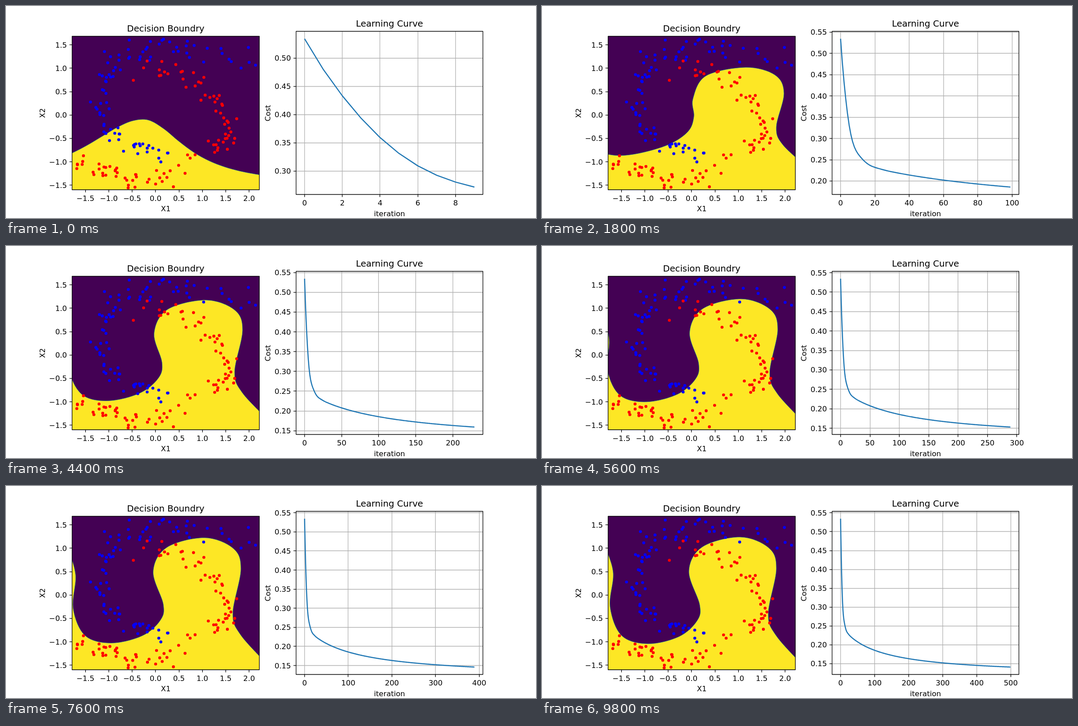
These frames come from a looping animation (1183 px wide and 473 px high, 10 s). An HTML page with a canvas:

```html
<!DOCTYPE html>
<html lang="en">
<head>
<meta charset="utf-8">
<title>Decision boundary and learning curve</title>
<style>
html, body { margin: 0; height: 100%; overflow: hidden; background: #fff; }
canvas { display: block; }
</style>
</head>
<body>
<canvas id="stage" width="1183" height="473"></canvas>
<script>
const ctx = document.getElementById('stage').getContext('2d');
const PT = 1183 / 720;               // one typographic point in pixels
const TICK = 3.5 * PT, THIN = 0.8 * PT;
const LEFT = { x0: 147.5, x1: 565.5, y0: 67.5, y1: 410 };
const RIGHT = { x0: 647.5, x1: 1064.5, y0: 56.5, y1: 420.5 };

// Slow hyperbolic decay plus a fast, slightly wavy exponential one
const cost = t => 0.1187 + 0.1335 / (1 + t / 100) + 0.2822 * Math.exp(-t / 4.15) +
  0.015 * Math.sin(0.6 * t) * Math.exp(-t / 5);

// Key points of the boundary after 10, 100 and 500 iterations
const hill = Array.from({ length: 16 }, (_, i) => {
  const x = 80 + 34 * i, u = (x - 306) / (x < 306 ? 155 : 113);
  return [x, 400 - 147 / (1 + u * u)];
});
const wave = [[105, 200], [108, 270], [122, 318], [160, 333], [215, 329], [283, 309],
  [326, 280], [339, 247], [337, 207], [366, 156], [455, 137], [520, 154], [540, 195],
  [523, 270], [537, 309], [590, 358]];
const fold = [[143, 140], [159, 195], [152, 270], [178, 334], [237, 352], [306, 336],
  [346, 301], [352, 265], [328, 190], [358, 136], [442, 114], [506, 138], [523, 185],
  [505, 285], [522, 333], [580, 398]];

const mix = (a, b, f) => a.map((p, i) => p.map((v, k) => v + (b[i][k] - v) * f));

function boundary(n) {
  return n < 100
    ? mix(hill, wave, (cost(9) - cost(n - 1)) / (cost(9) - cost(99)))
    : mix(wave, fold, (1 / 100 - 1 / n) / (1 / 100 - 1 / 500));
}

let seed = 7;
const random = () => (seed = (seed * 16807) % 2147483647) / 2147483647;
const noise = sd => (random() + random() + random() - 1.5) * 2 * sd;

// n samples scattered around a cubic Bezier arm
function arm(n, sd, a, b, c, d) {
  return Array.from({ length: n }, (_, i) => {
    const t = (i + random()) / n, s = 1 - t;
    return [0, 1].map(k => s * s * s * a[k] + 3 * s * s * t * b[k] +
      3 * s * t * t * c[k] + t * t * t * d[k] + noise(sd));
  });
}
const blue = [
  ...arm(70, 13, [225, 282], [165, 120], [300, 30], [565, 130]),
  ...arm(24, 10, [235, 290], [290, 300], [300, 320], [370, 330])
];
const red = [
  ...arm(44, 10, [150, 352], [220, 362], [290, 420], [390, 370]),
  ...arm(55, 12, [290, 145], [450, 130], [600, 310], [410, 335])
];

function smoothPath(p) {
  const path = new Path2D();
  path.moveTo(...p[0]);
  for (let i = 0; i < p.length - 1; i++) {
    const a = p[Math.max(i - 1, 0)], b = p[i], c = p[i + 1], d = p[Math.min(i + 2, p.length - 1)];
    path.bezierCurveTo(b[0] + (c[0] - a[0]) / 6, b[1] + (c[1] - a[1]) / 6,
      c[0] - (d[0] - b[0]) / 6, c[1] - (d[1] - b[1]) / 6, ...c);
  }
  return path;
}

function text(str, x, y, align = 'center', size = 10, angle = 0) {
  ctx.save();
  ctx.translate(x, Math.round(y));
  ctx.rotate(angle);
  ctx.font = `${size * PT}px "DejaVu Sans", sans-serif`;
  ctx.textAlign = align;
  ctx.fillStyle = '#000';
  ctx.fillText(str, 0, 0);
  ctx.restore();
}

function line(x0, y0, x1, y1, color = '#000') {
  ctx.strokeStyle = color;
  ctx.lineWidth = THIN;
  ctx.beginPath();
  ctx.moveTo(x0, y0);
  ctx.lineTo(x1, y1);
  ctx.stroke();
}

const snap = v => Math.floor(v) + 0.5;
const label = (v, digits) => v.toFixed(digits).replace('-', '\u2212');

function xTick(box, x, str) {
  line(snap(x), box.y1, snap(x), box.y1 + TICK);
  text(str, x, box.y1 + 24.5);
}
function yTick(box, y, str) {
  line(box.x0 - TICK, snap(y), box.x0, snap(y));
  text(str, box.x0 - 2 * TICK, y + 6, 'right');
}

function frameBox(box, title, xName, yName, yNameX) {
  const mid = (box.x0 + box.x1) / 2;
  ctx.strokeStyle = '#000';
  ctx.lineWidth = THIN;
  ctx.strokeRect(box.x0, box.y0, box.x1 - box.x0, box.y1 - box.y0);
  text(title, mid, box.y0 - 10.5, 'center', 12);
  text(xName, mid, box.y1 + 48);
  text(yName, yNameX, 239, 'center', 10, -Math.PI / 2);
}

function dots(list, color) {
  ctx.fillStyle = color;
  for (const [x, y] of list) {
    ctx.beginPath();
    ctx.arc(x, y, 3.3, 0, 2 * Math.PI);
    ctx.fill();
  }
}

function drawDecision(n) {
  const b = LEFT, edge = smoothPath(boundary(n)), area = new Path2D(edge);
  area.lineTo(600, 480);
  area.lineTo(60, 480);
  ctx.save();
  ctx.beginPath();
  ctx.rect(b.x0, b.y0, b.x1 - b.x0, b.y1 - b.y0);
  ctx.clip();
  ctx.fillStyle = '#440154';
  ctx.fillRect(b.x0, b.y0, 430, 360);
  ctx.fillStyle = '#fde725';
  ctx.fill(area);
  ctx.strokeStyle = '#21918c';
  ctx.lineWidth = 0.8;
  ctx.stroke(edge);
  dots(blue, '#00f');
  dots(red, '#f00');
  ctx.restore();

  for (let v = -1.5; v <= 2; v += 0.5) {
    xTick(b, 333.8 + 104.4 * v, label(v, 1));
    if (v < 2) yTick(b, 243.2 - 104.4 * v, label(v, 1));
  }
  frameBox(b, 'Decision Boundry', 'X1', 'X2', 87);
}

// Smallest round step giving at most 8 intervals
function niceStep(range) {
  const raw = range / 8, base = 10 ** Math.floor(Math.log10(raw));
  return base * [1, 2, 2.5, 5, 10].find(s => s * base >= raw);
}

function drawCurve(n) {
  const last = n - 1, top = cost(0), low = cost(last), b = RIGHT;
  const X = t => b.x0 + (b.x1 - b.x0) * (t / last + 0.05) / 1.1;
  const Y = v => b.y0 + (b.y1 - b.y0) * ((top - v) / (top - low) + 0.05) / 1.1;
  const step = niceStep(last * 1.1);
  for (let t = 0; t <= last * 1.05; t += step) {
    line(snap(X(t)), b.y0, snap(X(t)), b.y1, '#b0b0b0');
    xTick(b, X(t), label(t, 0));
  }
  for (let i = 2; i <= 11; i++) {
    const v = i / 20, y = Y(v);
    if (y < b.y0 || y > b.y1 + 0.5) continue;
    line(b.x0, snap(y), b.x1, snap(y), '#b0b0b0');
    yTick(b, y, label(v, 2));
  }
  ctx.strokeStyle = '#1f77b4';
  ctx.lineWidth = 1.5 * PT;
  ctx.lineJoin = 'round';
  ctx.beginPath();
  for (let t = 0; t < n; t++) ctx.lineTo(X(t), Y(cost(t)));
  ctx.stroke();
  frameBox(b, 'Learning Curve', 'iteration', 'Cost', 590);
}

function draw() {
  const n = 10 * (Math.floor(performance.now() % 10000 / 200) + 1);
  ctx.fillStyle = '#fff';
  ctx.fillRect(0, 0, 1183, 473);
  drawDecision(n);
  drawCurve(n);
  requestAnimationFrame(draw);
}
draw();
</script>
</body>
</html>
```
